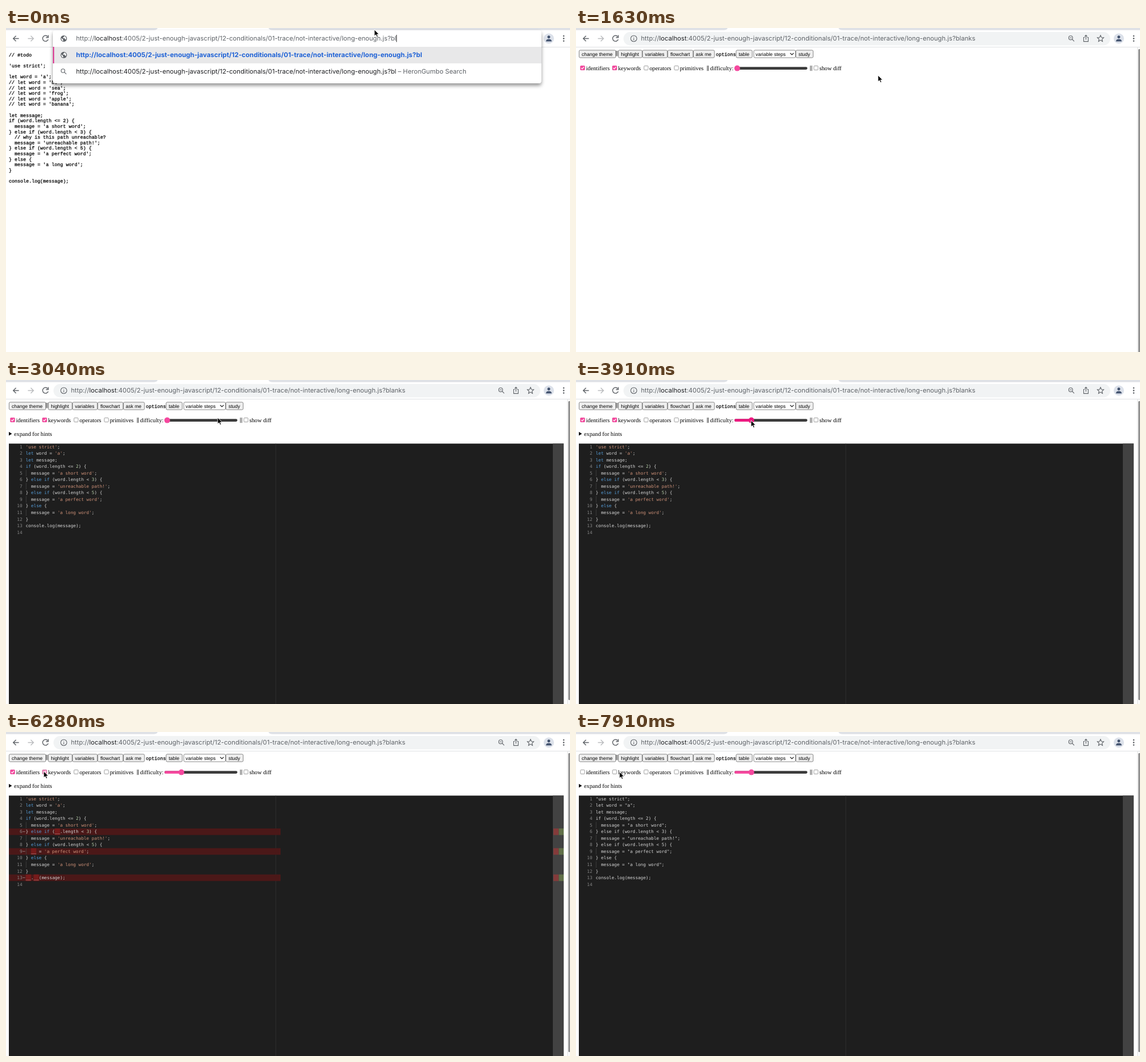
An HTML page that plays this animation: 986x568 px, repeating every 8000 ms.

```html
<!DOCTYPE html>
<html lang="en">
<head>
<meta charset="utf-8">
<title>Blanks exercise</title>
<style>
  html, body { margin: 0; width: 100%; height: 100%; overflow: hidden; background: #fff; }
  svg { display: block; width: 986px; height: 568px; }
  text { white-space: pre; text-rendering: geometricPrecision; }
  .ui { font: 11.19px Inter, sans-serif; fill: #5f6368; }
  .strong { font-size: 11.47px; font-weight: 700; fill: #1f62d6; }
  .ink { fill: #202124; }
  .raw { font: 8.32px "Liberation Mono", monospace; fill: #000; stroke: #000; stroke-width: .25px; }
  .page { font: 10.24px "Liberation Serif", serif; }
  .bars { font-weight: bold; }
  .button { font: 8.53px "Liberation Sans", sans-serif; }
  .code { font: 7.66px "DejaVu Sans Mono", monospace; fill: #d4d4d4; }
  .number { fill: #858585; text-anchor: end; }
  .keyword { fill: #569cd6; }
  .string { fill: #ce9178; }
  .digit { fill: #b5cea8; }
  .icon { fill: none; stroke: #5f6368; stroke-width: 1.4; }
</style>
</head>
<body>
<svg viewBox="0 0 986 568">
  <defs>
    <filter id="shadow" x="-5%" y="-10%" width="110%" height="130%">
      <feDropShadow dx="0" dy="4" stdDeviation="3" flood-opacity=".42"/>
    </filter>
    <g id="globe">
      <circle r="5.5" fill="#5f6368"/>
      <path d="M-4.3-1.2L-1 2V4.4Q-4.6 3.4-4.3-1.2ZM.5-4.4V-3L-1.2-2V-.6H1.6L2.4 1.2L3.6 2Q5.4-2 2-4Z" fill="#fff"/>
    </g>
  </defs>
  <rect width="986" height="568" fill="#fff"/>

  <g id="rawPage"></g>
  <g id="toolPage">
    <g id="controls"></g>
    <g id="slider">
      <rect x="277" y="68.2" width="127.5" height="4.8" rx="2.4" fill="#3b3b3b"/>
      <rect id="fill" x="277" y="68.2" height="4.8" rx="2.4"/>
      <circle id="thumb" cy="70.6" r="5"/>
    </g>
    <path d="M981.5 34V568" stroke="#e4e4e4"/>
    <rect x="982" y="34" width="4" height="534" fill="#fafafa"/>
    <rect id="scrollThumb" x="983" y="37" width="4" rx="1.5" fill="#929292"/>
  </g>
  <g id="editor">
    <path d="M5 91L10.4 94.3L5 97.6Z"/>
    <text class="page" x="14" y="97.7">expand for hints</text>
    <rect x="5" y="111.5" width="970" height="457" fill="#1e1e1e"/>
    <path d="M471.7 111.5V568" stroke="#343434" stroke-width=".8"/>
    <rect x="956" y="111.5" width="19" height="457" fill="#424242"/>
    <g id="colored"></g><g id="blanked"></g><g id="plain"></g>
  </g>

  <rect width="986" height="33" fill="#fff"/>
  <path d="M0 0H265Q264 3.8 258 3.8H0ZM459 0H986V3.8H466Q460 3.8 459 0Z" fill="#dee1e6"/>
  <path d="M0 33.5H986" stroke="#dfe1e4"/>
  <path class="icon" d="M22.5 18.5H13M17.5 13.7L12.7 18.5L17.5 23.3"/>
  <path class="icon" d="M38.3 18.5H48M43.3 13.7L48.1 18.5L43.3 23.3" style="stroke:#babcbe"/>
  <path id="reload" class="icon" d="M73 15.2A5 5 0 1 0 73.8 20M74 12.6V16.8H69.8"/>
  <path id="stop" class="icon" d="M64.7 14.2L73.3 22.8M73.3 14.2L64.7 22.8"/>
  <circle cx="949" cy="18.5" r="9" fill="#dce1ea"/>
  <path d="M949 13.2A2.5 2.5 0 1 1 948.9 13.2ZM944 23.4Q944 19.5 949 19.5T954 23.4Z" fill="#42526e"/>
  <g fill="#5f6368"><circle cx="975" cy="14" r="1.3"/><circle cx="975" cy="18.4" r="1.3"/><circle cx="975" cy="22.8" r="1.3"/></g>

  <g id="addressBar">
    <rect x="83" y="7" width="851" height="23.4" rx="11.7" fill="#f1f3f4"/>
    <g class="icon" style="stroke-width:1.1">
      <circle cx="101" cy="18.5" r="5.3"/><path d="M101 17.7V21.4M101 15.4V16.6"/>
      <circle cx="864.8" cy="17.2" r="3.4"/><path d="M867.3 19.7L871 23.4M863 17.2H866.6"/>
      <path d="M889.5 16.5H887.5V23.6H895.5V16.5H893.5M891.5 20.5V12.6M889.2 14.8L891.5 12.5L893.8 14.8"/>
      <path d="M917 12.8L918.6 16.5L922.6 16.9L919.6 19.5L920.5 23.5L917 21.4L913.5 23.5L914.4 19.5L911.4 16.9L915.4 16.5Z"/>
    </g>
    <text id="address" class="ui" x="113.5" y="22.3"></text>
  </g>
  <g id="popup">
    <path d="M82 9Q82 4 87 4H931Q936 4 936 9V92Q936 97 931 97H87Q82 97 82 92Z" fill="#fff" filter="url(#shadow)"/>
    <rect x="82" y="33" width="854" height="29" fill="#e8e8e9"/>
    <rect x="82" y="33" width="2.2" height="29" fill="#dc3f95"/>
    <use href="#globe" x="101" y="18.5"/><use href="#globe" x="101" y="47.3"/>
    <g class="icon" style="stroke-width:1.1"><circle cx="99.6" cy="75" r="3.2"/><path d="M102 77.4L105.4 80.8"/></g>
    <text id="typed" class="ui" x="122.5" y="22.3"></text>
    <path id="caret" d="M0 12V24.5" stroke="#222" stroke-width="1"/>
    <text id="suggestion" class="ui strong" x="122.5" y="51.3"></text>
    <text class="ui" x="122.5" y="80.1"><tspan id="query" class="ink"></tspan><tspan> – HeronGumbo Search</tspan></text>
  </g>
  <path id="pointer" d="M0 0V11L2.6 8.7L4.3 12.6L6.2 11.8L4.5 8H8Z" fill="#000" stroke="#fff" stroke-width=".8"/>
</svg>

<script>
const LOOP = 8000;
const $ = id => document.getElementById(id);

function add(parent, tag, attrs = {}, content = '') {
  const el = document.createElementNS('http://www.w3.org/2000/svg', tag);
  for (const name in attrs) el.setAttribute(name, attrs[name]);
  el.textContent = content;
  return parent.appendChild(el);
}
const label = (parent, cls, x, y, content) => add(parent, 'text', { class: cls, x, y }, content);
const box = (parent, x, y, width, height, fill, more) => add(parent, 'rect', { x, y, width, height, fill, ...more });

// Page contents
const program = `let message;
if (word.length <= 2) {
  message = 'a short word';
} else if (word.length < 3) {
  message = 'unreachable path!';
} else if (word.length < 5) {
  message = 'a perfect word';
} else {
  message = 'a long word';
}
console.log(message);`;
const rawText = `// #todo

'use strict';

let word = 'a';
// let word = 'be';
// let word = 'sea';
// let word = 'frog';
// let word = 'apple';
// let word = 'banana';

` + program.replace('} else if (word.length < 3) {', '$&\n  // why is this path unreachable?');
const rawLines = rawText.replace('\nconsole', '\n\nconsole').split('\n');
rawLines.forEach((line, i) => label($('rawPage'), 'raw', 5, 50 + i * 9.61, line));

const codeLines = `'use strict';\nlet word = 'a';\n${program}\n`.split('\n');
const blanks = { 6: '} else if (__.length < 3) {', 9: "  __ = 'a perfect word';", 13: '__.__(message);' };
const CHAR = 4.611, LEFT = 34.5, LINE = 11.52;

function writeCode(text, line) {
  for (const [, str, word, digit, rest] of line.matchAll(/('[^']*')|\b(let|if|else)\b|(\d)|([^'\dlie]+|.)/g)) {
    const cls = str ? 'string' : word ? 'keyword' : digit ? 'digit' : '';
    add(text, 'tspan', { class: cls }, str || word || digit || rest);
  }
}

function buildCode(parent, lines, { color = true, diff = {} } = {}) {
  lines.forEach((complete, i) => {
    const n = i + 1, line = diff[n] || complete, y = 119.8 + i * LINE, top = y - 8.3;
    if (diff[n]) {
      box(parent, 5, top, 475, LINE, '#4b1818');
      box(parent, 957, top, 9, LINE, '#833b3b');
      box(parent, 966.5, top, 8.5, LINE, '#617049');
      for (const m of line.matchAll(/__/g)) box(parent, LEFT + m.index * CHAR, top, 2 * CHAR, LINE, '#751b1b');
      add(parent, 'path', { d: `M29 ${y - 2.7}h4.5`, stroke: '#b0a0a0', 'stroke-width': .7 });
    }
    if (line.startsWith('  ')) box(parent, 34.8, top, .7, LINE, '#484848');
    label(parent, 'code number', 28.5, y, n);
    const text = label(parent, 'code', LEFT, y, '');
    if (color) writeCode(text, line);
    else text.textContent = line.replace(/'/g, '"');
  });
}
buildCode($('colored'), codeLines);
buildCode($('blanked'), codeLines, { diff: blanks });
buildCode($('plain'), codeLines, { color: false });

// Form controls
const controls = $('controls');
function button(left, right, textX, caption, fill = '#efefef') {
  box(controls, left + .4, 38.9, right - left - .8, 13.2, fill, { rx: 2, stroke: '#6a6a6a', 'stroke-width': .8 });
  label(controls, 'button', textX, 48.5, caption);
}
button(5, 70, 10, 'change theme');
button(73.5, 116, 78.5, 'highlight');
button(116, 160, 120.5, 'variables');
button(160, 205, 165, 'flowchart');
button(205, 242.5, 209.3, 'ask me');
button(279.5, 308.5, 284.5, 'table');
button(310.5, 384, 314, 'variable steps', '#fff');
button(384, 415, 389, 'study');
add(controls, 'path', { d: 'M374.5 44L377.5 47L380.5 44', fill: 'none', stroke: '#222', 'stroke-width': 1.2 });
label(controls, 'raw', 244.5, 48.5, 'options');
label(controls, 'page bars', 69.6, 47.3, '||');
label(controls, 'page bars', 228.2, 72.8, '||');
label(controls, 'page bars', 408.8, 72.8, '||');
label(controls, 'page', 234.6, 73.7, 'difficulty:');

function checkbox(x, caption) {
  box(controls, x - 3.6, 66.4, 7.2, 7.2, '#fff', { rx: 1.2, stroke: '#767676', 'stroke-width': .7 });
  const mark = add(controls, 'g');
  box(mark, x - 4, 66, 8, 8, '#f5489e', { rx: 1.2 });
  add(mark, 'path', { d: `M${x - 2.3} 70.2l1.7 1.7l3-3.8`, fill: 'none', stroke: '#fff', 'stroke-width': 1.2 });
  label(controls, 'page', x + 6, 74, caption);
  mark.style.opacity = 0;
  return mark;
}
const identifiers = checkbox(11.5, 'identifiers');
const keywords = checkbox(67.5, 'keywords');
checkbox(122.5, 'operators');
checkbox(175.5, 'primitives');
checkbox(419.5, 'show diff');

// Address text with the host emphasised
const path = ':4005/2-just-enough-javascript/12-conditionals/01-trace/not-interactive/long-enough.js?';
function writeUrl(el, tail) {
  el.textContent = '';
  add(el, 'tspan', {}, 'http://');
  add(el, 'tspan', { class: 'ink' }, 'localhost');
  add(el, 'tspan', {}, path + tail);
}
writeUrl($('address'), 'blanks');

// Each table row: start time, then the values held from then on
const pointerSteps = [
  [0, 644, 3], [1040, 641, 7], [1190, 604, 34], [1330, 556, 66], [1630, 528, 83], [1810, 498, 60],
  [2590, 495, 58], [2775, 440, 62], [2960, 370, 66], [3145, 306, 70], [3330, 281, 71],
  [3620, 285, 71], [3765, 296, 71], [3910, 306, 71],
  [5260, 296, 74], [5406, 250, 79], [5552, 180, 80], [5698, 120, 77], [5844, 82, 72], [5990, 66, 69],
  [6870, 60, 70], [7018, 45, 71], [7165, 28, 71], [7313, 16, 70], [7460, 11, 69], [7910, 76, 70]
];
const typingSteps = [[0, 'bl'], [150, 'bla'], [295, 'blank'], [440, 'blanks']];
const thumbSteps = [[0, 281.8], [3620, 285], [3765, 296], [3910, 306.6]];
const codeSteps = [[0, 'colored'], [4360, 'blanked'], [6430, 'plain'], [6570, 'blanked'], [7910, 'plain']];
const keywordSteps = [[0, 1], [6280, .6], [6430, 0]];
const identifierSteps = [[0, 1], [7760, .6], [7910, 0]];

const at = (steps, t) => steps.findLast(([start]) => t >= start).slice(1);
const show = (id, on) => { $(id).style.display = on ? '' : 'none'; };
let lastTyped;

function render(t) {
  const [x, y] = at(pointerSteps, t);
  $('pointer').setAttribute('transform', `translate(${x} ${y})`);

  const loading = t >= 740 && t < 1190;
  show('popup', t < 740);
  show('addressBar', t >= 740);
  show('stop', loading);
  show('reload', !loading);
  show('rawPage', t < 1190);
  show('toolPage', t >= 1330);
  show('editor', t >= 1810);
  $('scrollThumb').setAttribute('height', t < 1810 ? 540 : 524);

  const [typed] = at(typingSteps, t);
  if (typed !== lastTyped && t < 740) {
    lastTyped = typed;
    writeUrl($('typed'), typed);
    $('suggestion').textContent = $('query').textContent = 'http://localhost' + path + typed;
    $('caret').setAttribute('transform', `translate(${123 + $('typed').getComputedTextLength()} 0)`);
  }

  const [thumbX] = at(thumbSteps, t);
  const pink = t >= 3145 && t < 5260 ? '#ec1a80' : '#f5489e';
  $('thumb').setAttribute('cx', thumbX);
  $('fill').setAttribute('width', thumbX - 277);
  $('thumb').style.fill = $('fill').style.fill = pink;

  const [view] = at(codeSteps, t);
  for (const id of ['colored', 'blanked', 'plain']) show(id, id === view);
  keywords.style.opacity = at(keywordSteps, t)[0];
  identifiers.style.opacity = at(identifierSteps, t)[0];
}

const began = performance.now();
function tick() {
  render((performance.now() - began) % LOOP);
  requestAnimationFrame(tick);
}
render(0);
tick();
</script>
</body>
</html>
```
